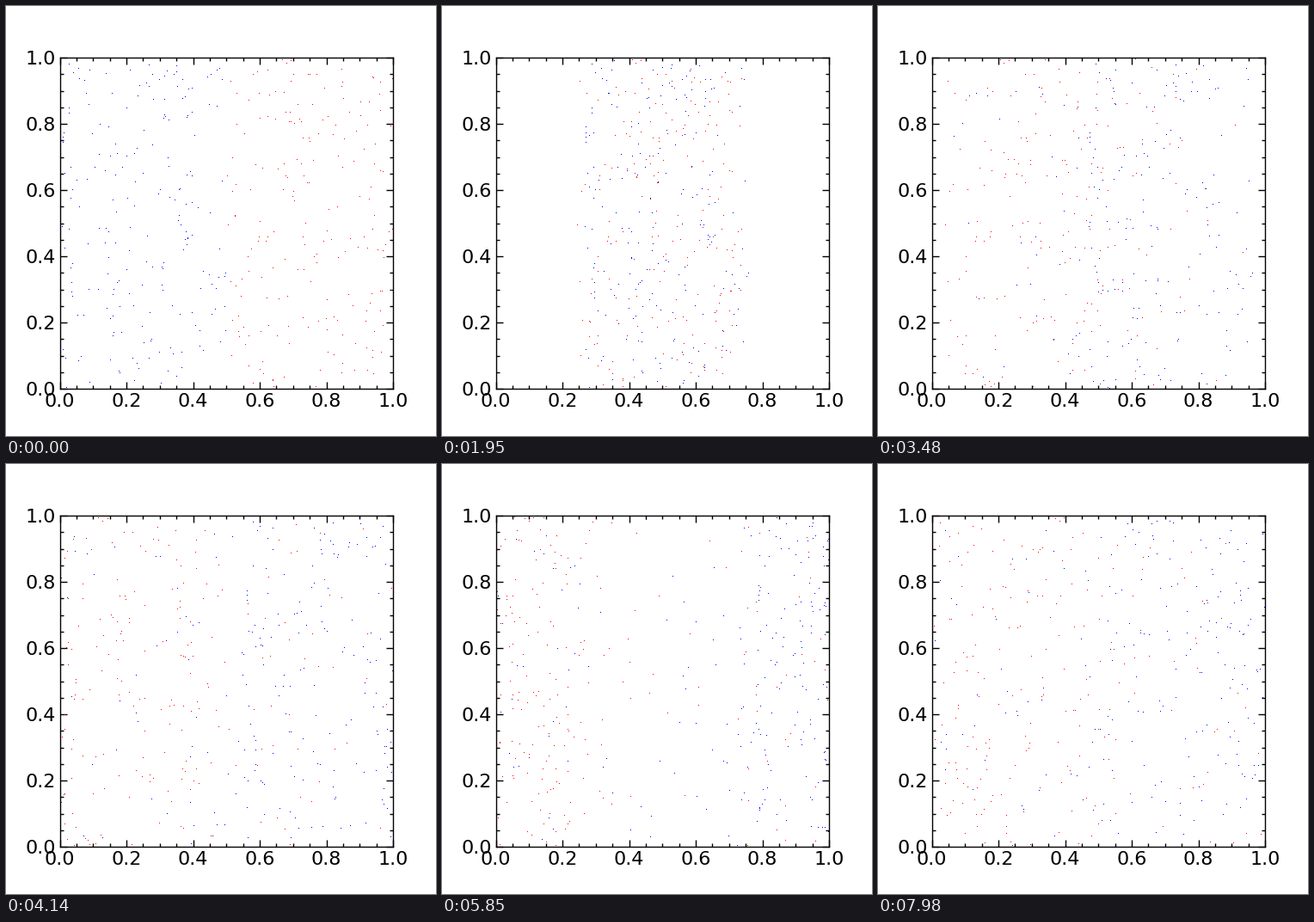
A matplotlib script for the animation above (8000 ms loop, 500x500 px).

```python
import numpy as np
import matplotlib.pyplot as plt
from matplotlib.animation import FuncAnimation
from matplotlib.ticker import MultipleLocator

HALF = 200        # particles per beam
SPEED = 0.004     # box widths per step
REACH = 0.004     # collision distance
STEPS = 267
STEP_MS = 30
TICK_MS = 20
LOOP_MS = 8000


def collide(pos, vel):
    """Elastic collisions between approaching particles of equal mass."""
    gap = pos[:, None] - pos[None]
    near = np.triu((gap ** 2).sum(axis=2) < REACH ** 2, 1)
    for i, j in np.argwhere(near):
        normal = pos[i] - pos[j]
        dist = np.hypot(*normal)
        if dist == 0:
            continue
        normal = normal / dist
        closing = np.dot(vel[i] - vel[j], normal)
        if closing < 0:
            vel[i] -= closing * normal
            vel[j] += closing * normal


def bounce(pos, vel):
    """Mirror particles that left the unit box."""
    low, high = pos < 0, pos > 1
    pos[low] *= -1
    pos[high] = 2 - pos[high]
    vel[low | high] *= -1


def simulate():
    rng = np.random.RandomState(11)
    pos = rng.rand(2 * HALF, 2)
    pos[:, 0] /= 2
    pos[HALF:, 0] += 0.5
    vel = np.zeros_like(pos)
    vel[:HALF, 0] = SPEED
    vel[HALF:, 0] = -SPEED
    path = [pos.copy()]
    for _ in range(STEPS - 1):
        pos += vel
        bounce(pos, vel)
        collide(pos, vel)
        path.append(pos.copy())
    return path


path = simulate()

plt.rcParams["font.family"] = "DejaVu Sans"
fig = plt.figure(figsize=(5, 5), dpi=100, facecolor="white")
ax = fig.add_axes([0.125, 0.11, 0.775, 0.77])
ax.set(xlim=(0, 1), ylim=(0, 1))
for axis in (ax.xaxis, ax.yaxis):
    axis.set_major_locator(MultipleLocator(0.2))
    axis.set_minor_locator(MultipleLocator(0.05))
ax.tick_params(which="both", direction="in", top=True, right=True, width=1)
ax.tick_params(which="major", length=6, labelsize=16, pad=3.3)
ax.tick_params(which="minor", length=3)
for spine in ax.spines.values():
    spine.set_linewidth(1)

blue, = ax.plot([], [], ",", color="#0000ff")
red, = ax.plot([], [], ",", color="#ff0000")


def draw(tick):
    step = min((tick * TICK_MS + TICK_MS // 2) // STEP_MS, STEPS - 1)
    pos = path[step]
    blue.set_data(pos[:HALF, 0], pos[:HALF, 1])
    red.set_data(pos[HALF:, 0], pos[HALF:, 1])
    return blue, red


anim = FuncAnimation(fig, draw, frames=LOOP_MS // TICK_MS, interval=TICK_MS,
                     init_func=lambda: draw(0), repeat=True, repeat_delay=0,
                     blit=True)
plt.show()
```
